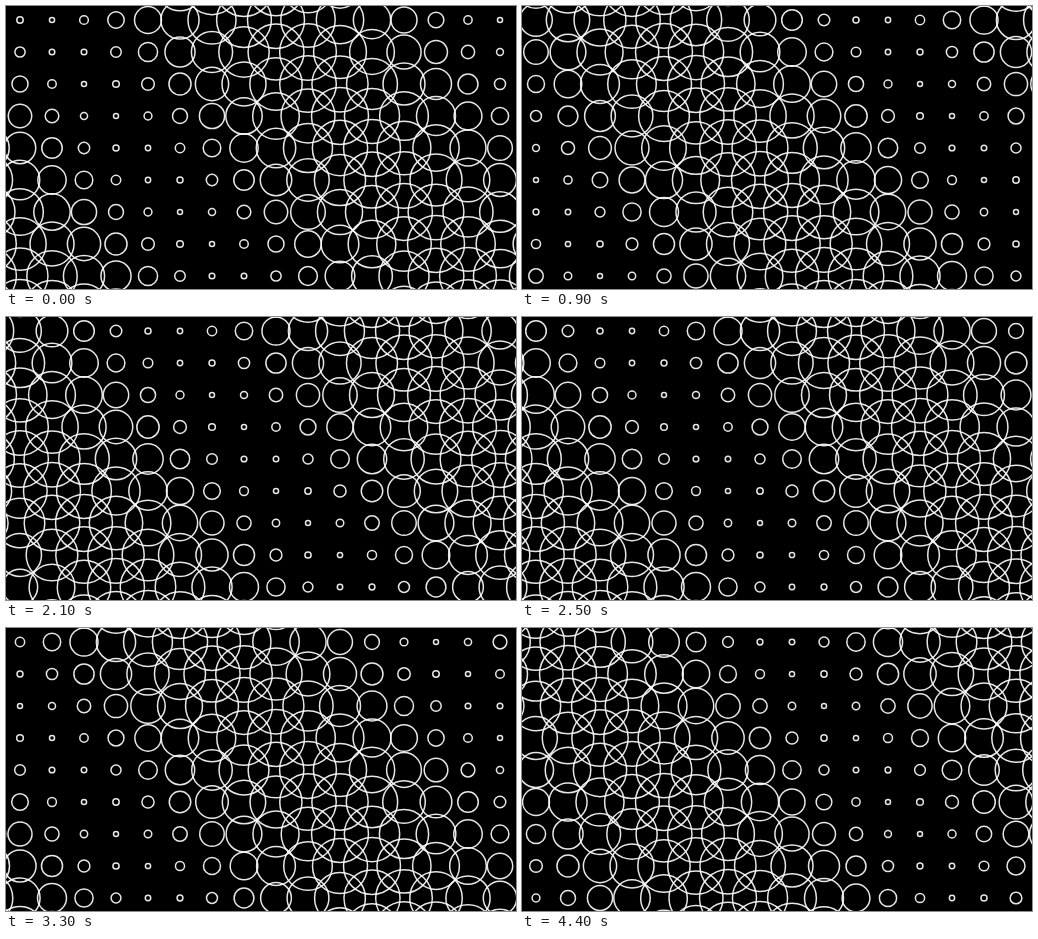
An HTML page with a canvas for the animation above (4.5 s loop, 510 by 283 pixels).

```html
<!DOCTYPE html>
<html lang="en">
<head>
<meta charset="utf-8">
<title>Circle wave</title>
<style>
  html, body { margin: 0; width: 100%; height: 100%; overflow: hidden; background: #000; }
  canvas { display: block; }
</style>
</head>
<body>
<canvas id="stage" width="510" height="283"></canvas>
<script>
  const ctx = document.getElementById('stage').getContext('2d');
  const STEP = 100, STEPS = 45;
  const CELL = 32, ORIGIN = 14;
  const COLS = 16, ROWS = 9;
  const TAU = 2 * Math.PI;

  // Diagonal wave drifting left by half a column per step; angles in degrees.
  function radius(col, row, step) {
    const angle = 25 * col - 18 * row + 12.5 * step - 19;
    return 15.5 - 13 * Math.cos(angle * TAU / 360);
  }

  function draw(step) {
    ctx.fillStyle = '#000';
    ctx.fillRect(0, 0, 510, 283);
    ctx.strokeStyle = 'rgba(255, 255, 255, 0.9)';
    ctx.lineWidth = 1.5;
    // One extra ring of cells reaches in from beyond the edges.
    for (let row = -1; row <= ROWS; row++) {
      for (let col = -1; col <= COLS; col++) {
        ctx.beginPath();
        ctx.arc(ORIGIN + CELL * col, ORIGIN + CELL * row, radius(col, row, step), 0, TAU);
        ctx.stroke();
      }
    }
  }

  const start = performance.now();
  let shown = -1;

  function tick() {
    const step = Math.floor((performance.now() - start) / STEP) % STEPS;
    if (step !== shown) draw(shown = step);
    requestAnimationFrame(tick);
  }
  tick();
</script>
</body>
</html>
```
